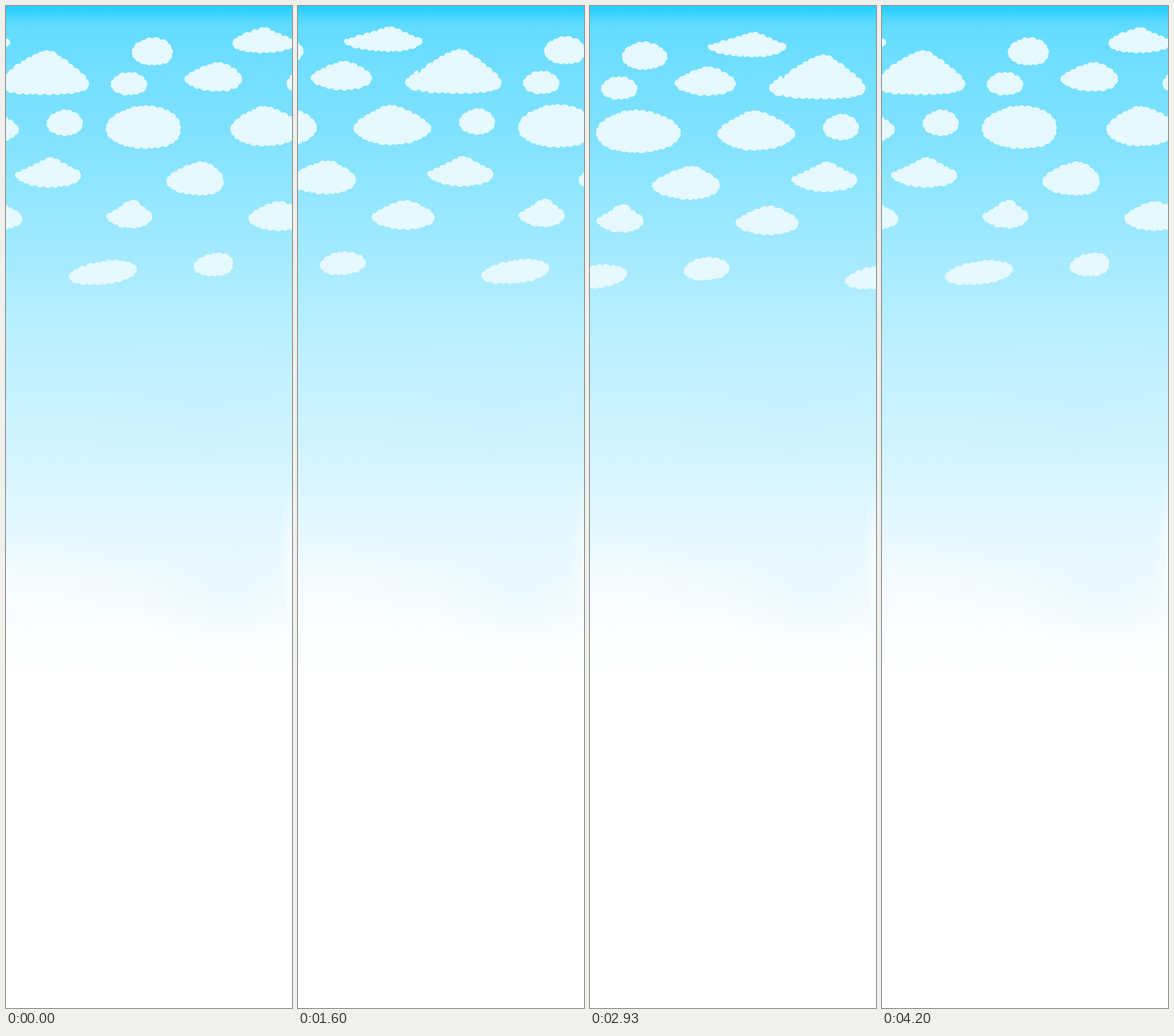
An HTML page for the animation above (4.27 s loop, 366 by 1280 pixels).

```html
<!DOCTYPE html>
<html lang="en">
<head>
<meta charset="utf-8">
<title>Drifting clouds</title>
<style>
html, body { margin: 0; width: 100%; height: 100%; overflow: hidden; }
body {
  background:
    radial-gradient(ellipse 16px 110px at 100% 710px, rgba(255,255,255,.7), rgba(255,255,255,0)),
    radial-gradient(ellipse 120px 75px at 8% 735px, rgba(255,255,255,.3), rgba(255,255,255,0)),
    radial-gradient(ellipse 130px 80px at 78% 745px, rgba(222,245,255,.45), rgba(222,245,255,0)),
    radial-gradient(ellipse 190px 110px at 70% 510px, rgba(198,238,252,.35), rgba(198,238,252,0)),
    linear-gradient(#2acdff 0, #34d1ff 8px, #52d8ff 16px, #62dcff 28px, #72dfff 80px,
      #7fe2ff 160px, #94e7ff 250px, #a9ebff 340px, #b6efff 400px, #c3f1ff 470px,
      #d0f4ff 560px, #dcf6ff 625px, #e5f8ff 680px, #f2fbff 740px, #fbfeff 800px, #fff 870px);
}
#sky { display: block; width: 366px; height: 1280px; }
#sky svg { overflow: hidden; }
</style>
</head>
<body>
<svg id="sky" viewBox="0 0 366 1280" fill="#e5f9ff"></svg>
<script>
const W = 366, H = 1280, LOOP = 4270, STEP = 200 / 3, LAST = 63;
const INSET = 1.5, BUMP = 8.5;

// Superellipse powers above and below the waist, and the waist's relative height.
const dome = { above: 1.7, below: 2.1, waist: 0.52 };
const mound = { above: 1.25, below: 1.9, waist: 0.56 };
const peaked = { above: 0.92, below: 1.8, waist: 0.58 };
const hill = { above: 1.15, below: 2.8, waist: 0.74 };

const clouds = [];
const cloud = (profile, left, right, top, bottom, peak, extra) =>
  clouds.push({ profile, left, right, top, bottom, peak, cutLeft: 0, cutRight: 0, tilt: 0, ...extra });

cloud(peaked, 269, 374, 26, 60, 331, { cutLeft: 20 });
cloud(dome, 160, 220, 40, 76, 188, { cutRight: 6 });
cloud(hill, -18, 108, 55, 113, 53, { cutLeft: 10 });
cloud(dome, 133, 182, 84, 114, 158);
cloud(mound, 227, 309, 71, 109, 272, { cutRight: 6 });
cloud(dome, 127, 237, 127, 182, 177, { cutRight: 13 });
cloud(dome, 51, 99, 132, 166, 77);
cloud(mound, 282, 384, 127, 179, 330, { cutLeft: 4 });
cloud(peaked, 10, 102, 191, 232, 57);
cloud(mound, 198, 288, 198, 242, 251, { cutLeft: 6, cutRight: 9 });
cloud(peaked, 127, 192, 245, 284, 162, { cutRight: 3 });
cloud(mound, 305, 390, 249, 287, 350, { cutLeft: 4 });
cloud(dome, 79, 169, 325, 355, 130, { tilt: -5 });
cloud(dome, 239, 300, 315, 345, 269, { cutRight: 9, tilt: -2 });

function seeded(seed) {
  return () => (seed = seed * 16807 % 2147483647) / 2147483647;
}

// Point of the smooth silhouette at an angle; `trim` 1 shortens the tips.
function silhouette(c, angle, trim) {
  const cos = Math.cos(angle), sin = Math.sin(angle);
  const { above, below, waist } = c.profile;
  const power = 2 / (sin < 0 ? above : below);
  const reach = Math.abs(cos) ** power, rise = Math.abs(sin) ** power;
  const middle = c.top + (c.bottom - c.top) * waist;
  const tip = cos < 0 ? c.left + INSET + c.cutLeft * trim * reach ** 2
                      : c.right - INSET - c.cutRight * trim * reach ** 2;
  const edge = sin < 0 ? c.top + INSET : c.bottom - INSET;
  return [
    c.peak + (tip - c.peak) * reach,
    middle + (edge - middle) * rise + c.tilt * reach * Math.sign(cos)
  ];
}

// Walks the silhouette and replaces it by scallops of uneven size.
function cloudPath(c, trim) {
  const random = seeded(c.top * 97 + 11), samples = 400;
  const nextSize = () => BUMP * (0.7 + 0.6 * random());
  const first = silhouette(c, Math.PI, trim);
  let from = first, size = nextSize(), d = 'M' + first;
  const bump = to => {
    const r = 0.65 * Math.hypot(to[0] - from[0], to[1] - from[1]);
    d += `A${r} ${r} 0 0 1 ${to}`;
    from = to;
  };
  for (let i = 1; i < samples; i++) {
    const p = silhouette(c, Math.PI + i / samples * 2 * Math.PI, trim);
    if (Math.hypot(p[0] - from[0], p[1] - from[1]) >= size) {
      bump(p);
      size = nextSize();
    }
  }
  bump(first);
  return d + 'Z';
}

function tile(trim) {
  const paths = clouds.map(c => `<path d="${cloudPath(c, trim)}"/>`).join('');
  const copies = [-W, 0, W].map(x => `<g transform="translate(${x})">${paths}</g>`).join('');
  return `<svg width="${W}" height="${H}"><g>${copies}</g></svg>`;
}

const sky = document.getElementById('sky');
sky.innerHTML = tile(1) + tile(0);
const [leaving, entering] = sky.children;

// Key poses of the drifting sky: step, x, y.
const poses = [[0, 0, 0], [15, 113, -1.5], [24, 154, -1.5], [32, 193, 0.3],
  [44, 246, 5.5], [54, 307, 6.8], [LAST, W, 0]];

// Smooth curve through one axis of the poses.
function along(axis, n) {
  const slope = i => {
    const a = poses[Math.max(0, i - 1)], b = poses[Math.min(poses.length - 1, i + 1)];
    return (b[axis] - a[axis]) / (b[0] - a[0]);
  };
  const i = Math.max(1, poses.findIndex(p => p[0] >= n));
  const a = poses[i - 1], b = poses[i];
  const h = b[0] - a[0], u = (n - a[0]) / h, w = 1 - u;
  return a[axis] * w * w * (1 + 2 * u) + b[axis] * u * u * (1 + 2 * w)
    + h * u * w * (slope(i - 1) * w - slope(i) * u);
}

function place(el, x, y) {
  el.setAttribute('x', x);
  el.firstChild.setAttribute('transform', `translate(0 ${y})`);
}

function draw(time) {
  const n = Math.min(LAST, Math.floor((time % LOOP + 4) / STEP));
  const x = Math.round(along(1, n)) % W, y = along(2, n);
  place(leaving, x, y);
  place(entering, x - W, y);
}

const start = performance.now();
function tick() {
  draw(performance.now() - start);
  requestAnimationFrame(tick);
}
tick();
</script>
</body>
</html>
```
